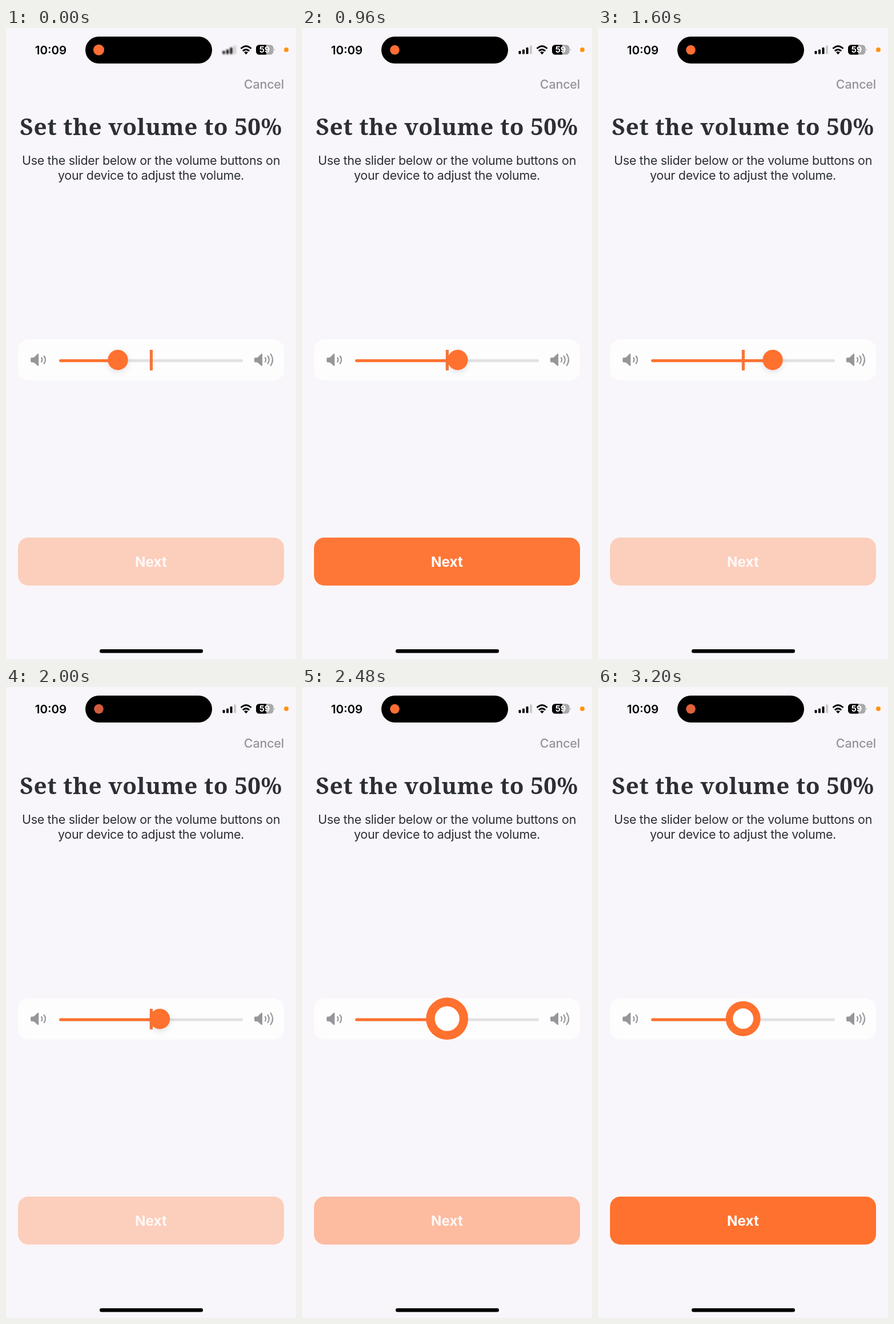
Write an HTML page that moves like this. It is 508 px wide and 1102 px high and loops after 3.28 s.

```html
<!DOCTYPE html>
<html lang="en">
<head>
<meta charset="utf-8">
<title>Volume setup</title>
<style>
  html, body { margin: 0; width: 100%; height: 100%; overflow: hidden; background: #f8f6fa; }
  svg { display: block; width: 100vw; height: 100vh; }
  text { font-family: Inter, "Open Sans", sans-serif; }
  .mid { text-anchor: middle; }
  .title { font: 600 40.5px "Noto Serif", serif; letter-spacing: .5px; fill: #2d2e36; }
  .body { font-size: 21.5px; letter-spacing: -.32px; fill: #2d2e36; }
  .line { fill: none; stroke-linecap: round; }
  .wave { stroke: #96969a; stroke-width: 2.2; }
  #thumb { filter: drop-shadow(0 4px 5px rgba(50, 30, 70, .12)); }
</style>
</head>
<body>
<svg viewBox="0 0 508 1102">
  <defs>
    <g id="speaker">
      <path d="M2 7.5H5.5L12 1.3Q14 0 14 2V21Q14 23 12 21.7L5.5 16H2Q0 16 0 14V9.5Q0 7.5 2 7.5Z" fill="#96969a"/>
      <path class="line wave" d="M19 8Q21.5 11.5 19 15M23.5 5Q28.2 11.5 23.5 18"/>
    </g>
    <clipPath id="cell"><rect x="438" y="29.5" width="30.5" height="17" rx="5.5"/></clipPath>
  </defs>

  <!-- status bar -->
  <text x="78.5" y="45.7" class="mid" font-size="20.5" font-weight="600">10:09</text>
  <rect x="139" y="15" width="222" height="47" rx="23.5"/>
  <circle id="rec" cx="162.5" cy="38.3"/>
  <g id="signal">
    <rect x="379.5" y="40" width="4" height="5.5" rx="1.2"/>
    <rect x="386" y="37.5" width="4" height="8" rx="1.2"/>
    <rect x="392.5" y="34" width="4" height="11.5" rx="1.2"/>
    <rect x="399" y="30.5" width="4" height="15" rx="1.2" fill="#cac9cc"/>
  </g>
  <path d="M411.5 36Q420.5 27.5 429.5 36M414.8 40.2Q420.5 35 426.2 40.2" fill="none" stroke="#000" stroke-width="3"/>
  <path d="M417 42.6Q420.5 39.7 424 42.6L420.5 46.2Z"/>
  <g clip-path="url(#cell)">
    <rect x="438" y="29" width="31" height="18" fill="#a9a8ab"/>
    <rect x="438" y="29" width="18" height="18"/>
  </g>
  <path d="M469.7 35.5Q472 38 469.7 40.5Z" fill="#a9a8ab"/>
  <text x="453" y="43.2" class="mid" font-size="14.5" font-weight="700" fill="#fff">59</text>
  <circle cx="491" cy="38" r="4" fill="#ff9310"/>

  <text x="487" y="106" text-anchor="end" font-size="21.5" font-weight="500" letter-spacing="-.2" fill="#949398">Cancel</text>
  <text x="254" y="187" class="mid title">Set the volume to 50%</text>
  <text x="254" y="238.5" class="mid body">Use the slider below or the volume buttons on</text>
  <text x="254" y="264.8" class="mid body">your device to adjust the volume.</text>

  <!-- slider -->
  <rect x="21" y="544" width="466" height="71.5" rx="18" fill="#fdfdfd"/>
  <use href="#speaker" x="43.2" y="568"/>
  <use href="#speaker" x="435" y="568"/>
  <path class="line wave" d="M463.7 569.5Q470.5 579.5 463.7 589.5"/>
  <path class="line" d="M95.5 581H412.5" stroke="#e1e1e3" stroke-width="5"/>
  <path id="fill" class="line" stroke="#ff712e" stroke-width="5"/>
  <rect x="251.8" y="562" width="5.2" height="36" rx="1" fill="#f9753a"/>
  <circle id="thumb" cy="579.7" r="17.7" fill="#ff712e"/>
  <g id="ring">
    <circle r="30.5" fill="#ff712e"/>
    <circle r="17.9" fill="#fff"/>
  </g>

  <!-- button -->
  <rect id="button" x="21" y="890" width="466" height="83.7" rx="18"/>
  <text id="label" x="254" y="940.5" class="mid" font-size="24.3" font-weight="650" fill="#fff">Next</text>

  <rect x="164" y="1085" width="181" height="6.5" rx="3.2"/>
</svg>
<script>
const LOOP = 3280, STEP = 80;
const START = 196, FAR = 316, GOAL = 254;
const LOCK = 2480, PULSE = 1360;
const $ = id => document.getElementById(id);

const ramp = (t, start, span) => Math.min(1, Math.max(0, (t - start) / span));
const easeOut = p => 1 - (1 - p) ** 2;
const mix = (a, b, k) => `rgb(${a.map((v, i) => Math.round(v + (b[i] - v) * k))})`;

// drag past the goal, pause, then ease back onto it
const thumbX = t => START
  + (FAR - START) * easeOut(ramp(t, 640, 800))
  + (GOAL - FAR) * easeOut(ramp(t, 1520, 960));

// lights up while passing the goal, then again once locked
const active = t => ramp(t, 830, 120) - ramp(t, 950, 150) + ramp(t, LOCK - 40, 200);

const glow = t => Math.min(1, 1.1 * (1 - Math.cos(2 * Math.PI * (t - 640) / PULSE)));

function draw(t) {
  const x = thumbX(t), on = active(t), blur = 1 - ramp(t, 0, 320);
  const locked = t >= LOCK;
  const scale = 1.21 - .21 * easeOut(ramp(t, LOCK, 160));

  $('fill').setAttribute('d', `M95.5 581H${x}`);
  $('thumb').setAttribute('cx', x);
  $('thumb').style.display = locked ? 'none' : '';
  $('ring').style.display = locked ? '' : 'none';
  $('ring').setAttribute('transform', `translate(${GOAL + .2} 579.2) scale(${scale})`);

  $('button').setAttribute('fill', mix([252, 206, 188], [255, 113, 46], on));
  $('label').setAttribute('opacity', .88 + .12 * on);

  $('rec').setAttribute('r', 8.3 + 1.2 * blur);
  $('rec').setAttribute('fill', mix([212, 92, 62], [255, 110, 52], glow(t)));
  $('rec').style.filter = `blur(${.6 * blur}px)`;
  $('signal').style.filter = `blur(${1.8 * blur}px)`;
}

function tick() {
  draw(Math.floor(performance.now() % LOOP / STEP) * STEP);
  requestAnimationFrame(tick);
}
tick();
</script>
</body>
</html>
```
